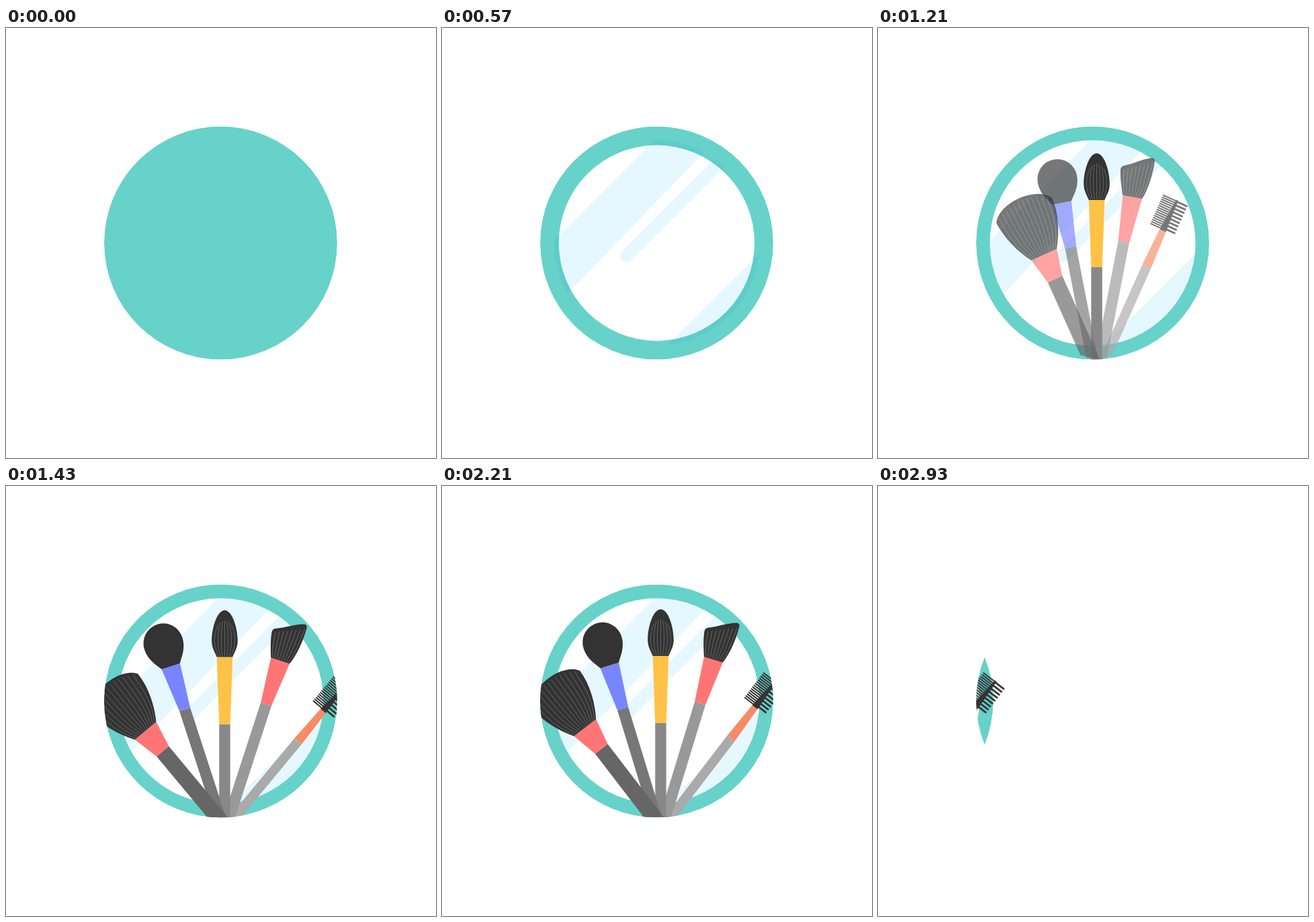
Animation of 640x640 px, one loop 3000 ms. Source, as an HTML page with a canvas:

```html
<!DOCTYPE html>
<html lang="en">
<head>
<meta charset="utf-8">
<title>Make-up brushes</title>
<style>
  html, body { margin: 0; width: 100%; height: 100%; overflow: hidden; background: #fff; }
  canvas { display: block; }
</style>
</head>
<body>
<canvas id="stage" width="640" height="640"></canvas>
<script>
const stage = document.getElementById('stage').getContext('2d');
const layerCanvas = document.createElement('canvas');
layerCanvas.width = layerCanvas.height = 640;
const layer = layerCanvas.getContext('2d');

const CX = 319.5, CY = 320, RADIUS = 173.5, GLASS = 153;
const PIVOT_X = 326, PIVOT_Y = 495, HANDLE_END = -2.2;
const TEAL = '#67d2ca', SHINE = '#e6f8ff', BRISTLE = '#333';

const clamp = v => Math.max(0, Math.min(1, v));

// Linear move from 0 to 1, then a damped swing around 1.
function spring(t, start, duration) {
  const s = t - start - duration;
  if (s < 0) return clamp(1 + s / duration);
  return 1 + 0.05 / duration * Math.sin(8 * Math.PI * s) * Math.exp(-8 * s);
}

function circle(r) {
  stage.beginPath();
  stage.arc(CX, CY, r, 0, 2 * Math.PI);
}

function polygon(ctx, color, ...points) {
  ctx.fillStyle = color;
  ctx.beginPath();
  for (const [x, y] of points) ctx.lineTo(x, y);
  ctx.fill();
}

// Head outlines start at the ferrule and grow towards negative y.
const comb = new Path2D('M-5 0L-.5 -50L2.8 -50L5 0Z');
for (let i = 0; i < 15; i++) comb.rect(-21.2, -49.4 + i * 3.3, 21.2, 2);
for (let i = 0; i < 9; i++) comb.rect(0, -49.2 + i * 5.5, 18.7, 2.8);

const brushes = [
  { angle: 37.4, x: 10.2, handle: '#aaa', ferrule: '#f78b64', low: 158, high: 216.5, wide: [7, 5], head: comb },
  { angle: 17, x: 5.4, handle: '#999', ferrule: '#ff7576', low: 181, high: 249, wide: [8.3, 14.6],
    head: new Path2D('M-14.6 0C-19 -12 -24 -26 -25.2 -37Q-25.5 -41 -22 -43C-8 -49 5 -59 17 -62.5Q22 -63.5 22.5 -58C23.5 -40 21 -15 14.6 0Z'),
    hair: { n: 8, base: 12, mid: 18, tip: 20, h: 47, tilt: 9, drop: 0 } },
  { angle: 0, x: -0.5, handle: '#888', ferrule: '#ffc247', low: 142, high: 242, wide: [8.2, 11.8],
    head: new Path2D('M-11.8 0C-15 -8 -19.3 -14 -19.3 -24C-19.3 -44 -11 -69.5 0 -69.5C11 -69.5 19.3 -44 19.3 -24C19.3 -14 15 -8 11.8 0Z'),
    hair: { n: 7, base: 9, mid: 17, tip: 10, h: 54, tilt: 0, drop: 6 } },
  { angle: -17, x: -6.6, handle: '#777', ferrule: '#7885ff', low: 173, high: 240.5, wide: [8.4, 14.4],
    head: new Path2D('M-14.4 0C-19 -8 -29.6 -18 -29.6 -36A29.6 29.6 0 0 1 29.6 -36C29.6 -18 19 -8 14.4 0Z') },
  { angle: -37.5, x: -7.3, handle: '#666', ferrule: '#ff7576', low: 136.3, high: 176.3, wide: [11.8, 20.7],
    head: new Path2D('M-20.7 0C-34 -20 -44 -46 -45.5 -72C-30 -98 30 -98 45.5 -72C45 -46 34 -20 20.7 0Z'),
    hair: { n: 12, base: 18, mid: 36, tip: 39, h: 88, tilt: 0, drop: 12 } }
];

function drawHair({ n, base, mid, tip, h, tilt, drop }) {
  layer.strokeStyle = '#777';
  layer.lineWidth = 0.7;
  layer.beginPath();
  for (let i = 0; i < n; i++) {
    const k = 2 * i / (n - 1) - 1;
    layer.moveTo(k * base, -1);
    layer.bezierCurveTo(k * mid, -h * 0.3, k * mid, -h * 0.6, k * tip, -h - k * tilt + k * k * drop);
  }
  layer.stroke();
}

// Each brush is composed on its own layer, so that it fades as a whole.
function drawBrush(b, rise, fan, alpha) {
  const [narrow, broad] = b.wide;
  const lean = b.angle * Math.PI / 180;
  // Handles end level when the fan is fully open.
  const end = x => (HANDLE_END - (b.x + x) * Math.sin(lean)) / Math.cos(lean);

  layer.clearRect(0, 0, 640, 640);
  layer.save();
  layer.translate(PIVOT_X, PIVOT_Y + rise);
  layer.rotate(lean * fan);
  layer.translate(b.x, 0);
  polygon(layer, b.handle, [-narrow, -b.low], [narrow, -b.low], [narrow, end(narrow)], [-narrow, end(-narrow)]);
  polygon(layer, b.ferrule, [-broad, -b.high], [broad, -b.high], [narrow, -b.low], [-narrow, -b.low]);
  layer.translate(0, -b.high);
  layer.fillStyle = BRISTLE;
  layer.fill(b.head);
  if (b.hair) drawHair(b.hair);
  layer.restore();

  stage.globalAlpha = alpha;
  stage.drawImage(layerCanvas, 0, 0);
}

function drawMirror(t) {
  stage.fillStyle = TEAL;
  circle(RADIUS);
  stage.fill();
  stage.fillStyle = '#fff';
  circle(GLASS * spring(t, 1 / 6, 0.2));
  stage.fill();

  stage.save();
  circle(GLASS);
  stage.clip();
  stage.globalCompositeOperation = 'multiply';
  stage.globalAlpha = clamp((t - 1 / 6) / 0.2);
  polygon(stage, SHINE, [150, 333], [330, 153], [420, 154], [170, 413]);
  polygon(stage, SHINE, [488, 320], [488, 488], [320, 488]);
  stage.strokeStyle = SHINE;
  stage.lineWidth = 19;
  stage.lineCap = 'round';
  stage.beginPath();
  stage.moveTo(274.5, 339.5);
  stage.lineTo(434, 180);
  stage.stroke();
  stage.restore();
}

function draw(t) {
  const rise = 312 * (1 - spring(t, 19 / 30, 1 / 3));
  const fan = spring(t, 1, 0.31);
  const fade = clamp((t - 1) / 0.3);

  stage.clearRect(0, 0, 640, 640);
  stage.save();
  circle(RADIUS);
  stage.clip();
  stage.translate(-1072 * Math.max(0, t - 2.6), 0);
  drawMirror(t);
  for (const b of brushes) {
    if (b.angle) drawBrush(b, 0, fan, fade);
    else drawBrush(b, rise, 0, 1);
  }
  stage.restore();
}

// The picture is held at 14 steps a second, taken from a 30 per second clock.
function tick() {
  const step = Math.floor((performance.now() % 3000 + 5) * 14 / 1000) % 42;
  draw(Math.floor(step * 30 / 14) / 30);
  requestAnimationFrame(tick);
}
tick();
</script>
</body>
</html>
```
